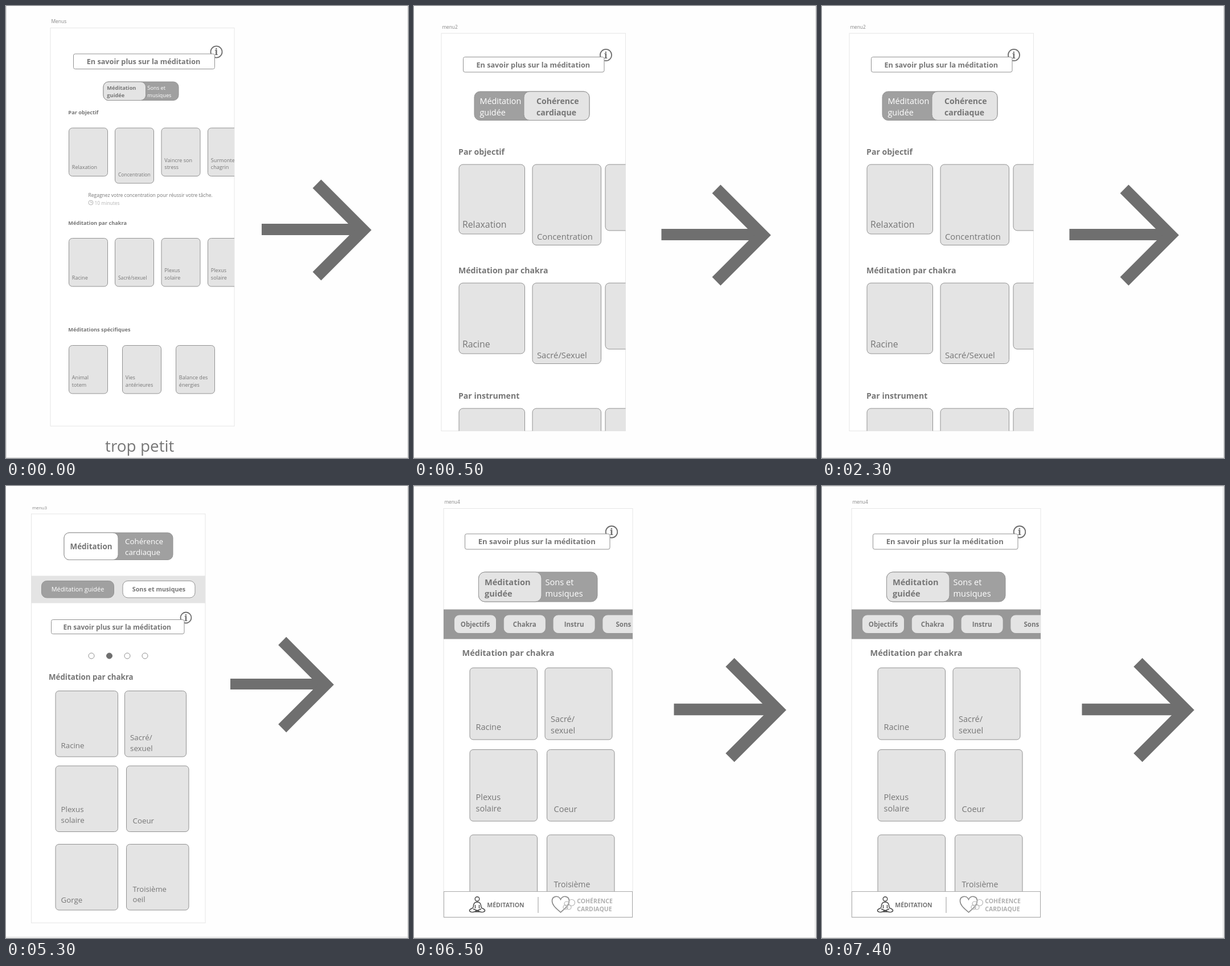
Animation of 706x793 px, one loop 8 s. Source, as an HTML page:

```html
<!DOCTYPE html>
<html lang="fr">
<head>
<meta charset="utf-8">
<title>Menus de méditation</title>
<style>
  html, body { margin: 0; width: 100%; height: 100%; overflow: hidden; background: #fefefe; }
  svg { display: block; width: 706px; height: 793px; }
  text { font-family: "Open Sans", "Noto Sans", sans-serif; }
  .serif { font-family: "Noto Serif", serif; }
</style>
</head>
<body>
<svg id="stage" viewBox="0 0 706 793"></svg>
<script>
const LIGHT = "#e4e4e4", DARK = "#a0a0a0", EDGE = "#929292", INK = "#767676", SOLID = "#6f6f6f";

const box = (x, y, w, h, r = 0, fill = LIGHT, stroke = EDGE) =>
  `<rect x="${x}" y="${y}" width="${w}" height="${h}" rx="${r}" fill="${fill}" stroke="${stroke}"/>`;

const disc = (x, y, r, fill = "none", stroke = EDGE, width = 1) =>
  `<circle cx="${x}" cy="${y}" r="${r}" fill="${fill}" stroke="${stroke}" stroke-width="${width}"/>`;

const path = (d, stroke, width = 1) =>
  `<path d="${d}" fill="none" stroke="${stroke}" stroke-width="${width}"/>`;

// Lines are separated by "|"; y is the first baseline.
function text(x, y, content, size, { fill = INK, weight = 400, anchor = "start" } = {}) {
  const left = anchor === "start" ? x - size * 0.07 : x;
  return content.split("|").map((line, i) =>
    `<text x="${left}" y="${y + i * size * 1.42}" font-size="${size}" font-weight="${weight}"
      fill="${fill}" text-anchor="${anchor}">${line}</text>`).join("");
}
const bold = (x, y, content, size, options) => text(x, y, content, size, { weight: 700, ...options });

// A card with its label, placed relative to the card's left edge.
const card = (x, y, w, h, r, label = "", dx = 0, baseline = 0, size = 0) =>
  box(x, y, w, h, r) + text(x + dx, baseline, label, size);

function arrow(start, tip, y, k = 1) {
  const corner = tip - 15 * k, d = 81 * k;
  return path(`M${start} ${y}H${corner}`, SOLID, 20 * k) +
    path(`M${corner - d} ${y + 1 - d}l${d} ${d}l${-d} ${d}`, SOLID, 21 * k);
}

const moreButton = (x, y, w, h, size) =>
  disc(x + w + 3, y - 3.5, h * 0.38, "#fff", SOLID, 1.8) +
  `<text class="serif" x="${x + w + 3}" y="${y + 2}" font-size="${h * 0.62}" font-weight="700"
    fill="${SOLID}" text-anchor="middle">i</text>` +
  box(x, y, w, h, 3, "#fff") +
  bold(x + w / 2 - 1, y + h / 2 + size * 0.38, "En savoir plus sur la méditation", size, { anchor: "middle" });

// The active half lies over a dark pill.
const toggle = (x, y, w, h, r, activeX, activeW, fill = LIGHT) =>
  box(x, y, w, h, r, DARK) + box(activeX, y, activeW, h, r, fill);

let frames = 0;
function frame(name, x, y, w, h, size, content) {
  const id = "frame" + frames++;
  return text(x + 2, y - 8.5, name, size, { fill: "#858585" }) +
    box(x, y, w, h, 0, "#fff", "#e6e6e6") +
    `<clipPath id="${id}"><rect x="${x}" y="${y}" width="${w}" height="${h}"/></clipPath>
     <g clip-path="url(#${id})">${content}</g>`;
}

const border = d => path(d, "#d6d6d6");
const white = { fill: "#fff" };
const middle = { anchor: "middle" };

function smallMenu() {
  const size = 9.05, columns = [110.5, 191.5, 273, 354.5];
  const row = (y, xs, labels, tall = -1) => xs.map((x, i) => {
    const h = i === tall ? 97 : 84.5, lines = labels[i].split("|").length;
    const long = /^(Conc|Sacr)/.test(labels[i]);
    return card(x, y, 68, h, 6, labels[i], 6, y + h - (lines > 1 ? 25 : 12.3), long ? 8.6 : size);
  }).join("");
  return border("M.5 0V793M705.5 0V793M0 792.5H706") +
    frame("Menus", 78, 38.5, 323, 698.5, 8.5,
      moreButton(118.5, 84, 248, 26.5, 12.7) +
      toggle(171, 133, 132, 32.5, 9, 171, 74.5) +
      bold(178, 147, "Méditation|guidée", 9.25) + text(249, 147, "Sons et|musiques", 9.3, white) +
      bold(110, 190, "Par objectif", 9.25) +
      row(214, columns, ["Relaxation", "Concentration", "Vaincre son|stress", "Surmonter|chagrin"], 1) +
      text(145, 334.5, "Regagnez votre concentration pour réussir votre tâche.", 8.55) +
      disc(149, 345, 4, "none", "#b5b5b5") + path("M149 342.5V345H151.5", "#b5b5b5") +
      text(156, 348.5, "10 minutes", 8.5, { fill: "#b5b5b5" }) +
      bold(110, 383.5, "Méditation par chakra", 9.2) +
      row(407.5, columns, ["Racine", "Sacré/sexuel", "Plexus|solaire", "Plexus|solaire"]) +
      bold(110, 571, "Méditations spécifiques", 9.2) +
      row(595.5, [110.5, 204.5, 298.5], ["Animal|totem", "Vies|antérieures", "Balance des|énergies"])) +
    text(176, 782, "trop petit", 27.9) +
    arrow(449, 642, 392);
}

function largeCards() {
  const row = (y, h, first = "", second = "") =>
    card(79, y, 115.5, h, 7, first, 7, y + h - 11.5, 15.9) +
    card(208, y, 120.5, 141.5, 7, second, 9, y + 131.5, 14.8) +
    card(336, y, 115.5, 116, 7);
  return border("M705.5 0V793M0 792.5H706") +
    frame("menu2", 48, 48, 323.5, 697.5, 8.3,
      moreButton(86.5, 89.5, 247.5, 26.5, 12.7) +
      toggle(106, 150, 202, 50.5, 10, 193, 115) +
      text(116.5, 172, "Méditation|guidée", 14.4, white) + bold(216, 172, "Cohérence|cardiaque", 14.1) +
      bold(79, 261, "Par objectif", 14.15) + row(278, 122, "Relaxation", "Concentration") +
      bold(79, 469, "Méditation par chakra", 14.1) + row(486, 124, "Racine", "Sacré/Sexuel") +
      bold(79, 689, "Par instrument", 14.1) + row(706, 122)) +
    arrow(434.5, 627, 401);
}

function dottedPages() {
  const size = 13.3;
  return border("M705.5 0V793M0 791.5H706") +
    frame("menu3", 44.5, 49, 305.5, 717.5, 7.9,
      toggle(102, 82, 191, 47.5, 9, 102, 95, "#fff") +
      bold(113.5, 111, "Méditation", 13.4) + text(210, 102, "Cohérence|cardiaque", 13.4, white) +
      box(44, 157.5, 307, 48, 0, LIGHT, "none") +
      box(62.5, 166.5, 127, 29.5, 9, DARK) +
      text(126, 185, "Méditation guidée", 10.95, { ...white, ...middle }) +
      box(205, 166.5, 127, 29.5, 9, "#fff") + bold(268.5, 185, "Sons et musiques", 10.75, middle) +
      moreButton(79.5, 234.5, 233.5, 25, 12.05) +
      [150, 181.5, 213, 244].map((x, i) => disc(x, 298, 5, i === 1 ? SOLID : "#fff", i === 1 ? SOLID : EDGE)).join("") +
      bold(76, 340, "Méditation par chakra", 13.3) +
      card(87, 359.5, 109.5, 115.5, 6, "Racine", 10.5, 459.5, size) +
      card(208.5, 359.5, 108, 115.5, 6, "Sacré/|sexuel", 10.5, 446, size) +
      card(87, 491, 109.5, 115.5, 6, "Plexus|solaire", 10.5, 572, size) +
      card(211.5, 491, 109.5, 115.5, 6, "Coeur", 12, 592, size) +
      card(87, 628.5, 109.5, 115.5, 6, "Gorge", 10.5, 731, size) +
      card(211.5, 628.5, 109.5, 115.5, 6, "Troisième|oeil", 12, 711.5, 13.1)) +
    arrow(394, 576, 347.5, 0.946);
}

function tabBar() {
  const lotus = disc(111, 724.5, 3.8, "none", "#444", 1.4) +
    path("M111 730C105 730 104.500 734 104 739C103 742 99 741 97.500 744C97 748 103 748 106 747L118 742" +
      "M111 730C117 730 117.500 734 118 739C119 742 123 741 124.500 744C125 748 119 748 116 747L104 742" +
      "M107.500 735V741M114.500 735V741M106 747H116", "#444", 1.4);
  const heart = path("M257.500 748C251 742 242.500 736 242.500 728C242.500 719 254 717.500 257.500 725.500" +
    "C261 717.500 272.500 719 272.500 728C272.500 736 264 742 257.500 748Z", "#8a8a8a", 1.6);
  const petals = [[268, 733], [277, 731], [272, 739], [266, 739]]
    .map(([x, y], i) => disc(x, y, i === 1 ? 5.5 : 4, "none", "#b4b4b4", 1.2)).join("");
  return box(52.5, 711.5, 331, 45, 0, "#fff", "#aaa") + lotus +
    bold(129, 739, "MÉDITATION", 10.5) + path("M218 721V749", "#999") + heart + petals +
    bold(287, 731.5, "COHÉRENCE|CARDIAQUE", 10.5, { fill: "#b0b0b0" });
}

function tabbedMenu() {
  const size = 14.5;
  const chips = ["Objectifs", "Chakra", "Instru", "Sons"].map((label, i) => {
    const x = 71.5 + i * 86.8;
    return box(x, 227, 72, 30.5, 8, LIGHT, LIGHT) + bold(x + 36, 246.5, label, 11.5, middle);
  }).join("");
  return border("M0 .5H706M704.5 0V793M0 792.5H706") +
    frame("menu4", 52, 39.5, 332, 717.5, 8.3,
      moreButton(89.5, 84, 254.5, 27, 13.1) +
      toggle(113.5, 151, 208.5, 52, 11, 113.5, 110.5) +
      bold(125, 173.5, "Méditation|guidée", 14.6) + text(231.5, 173.5, "Sons et|musiques", 14.6, white) +
      box(52, 216.5, 332, 52, 0, "#989898", "none") + chips +
      bold(85.5, 297.5, "Méditation par chakra", 14.5) +
      card(98, 319, 118.5, 126, 6, "Racine", 11.5, 428, size) +
      card(230, 319, 118, 126, 6, "Sacré/|sexuel", 11, 413.5, size) +
      card(98, 462.5, 118.5, 125.5, 6, "Plexus|solaire", 11.5, 550.5, size) +
      card(233.5, 462.5, 118.5, 125.5, 6, "Coeur", 13, 572, size) +
      card(98, 612, 118.5, 125.5, 6) +
      card(233.5, 612, 118.5, 125.5, 6, "Troisième", 13, 703.5, 14.1) +
      tabBar()) +
    arrow(456.5, 654, 392, 1.032);
}

const LOOP = 8000, ends = [500, 3500, 6500, LOOP];
const stage = document.getElementById("stage");
stage.innerHTML = [smallMenu, largeCards, dottedPages, tabbedMenu]
  .map(draw => `<g class="scene">${draw()}</g>`).join("");
const scenes = stage.querySelectorAll(".scene");

function show() {
  const time = performance.now() % LOOP;
  const current = ends.findIndex(end => time < end);
  scenes.forEach((scene, i) => scene.style.display = i === current ? "" : "none");
  requestAnimationFrame(show);
}
show();
</script>
</body>
</html>
```
